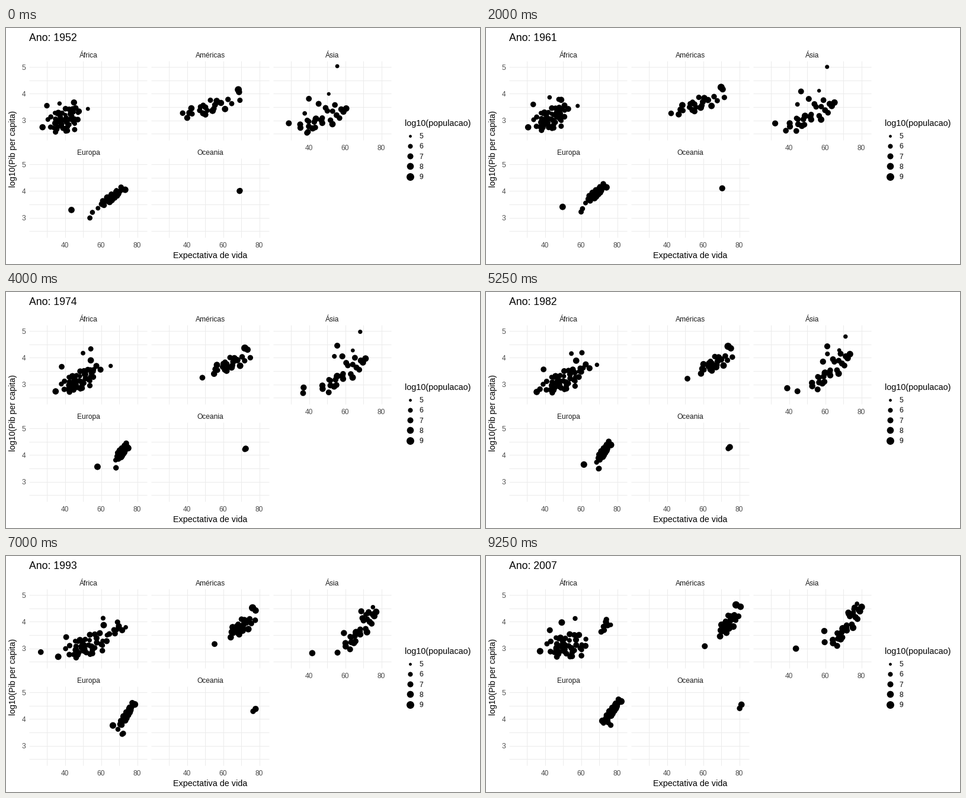
Write a matplotlib script that moves like this. It is 800 px wide and 400 px high and loops after 10 s.

```python
import numpy as np
import matplotlib.pyplot as plt
from matplotlib.animation import FuncAnimation

plt.rcParams["font.family"] = "Liberation Sans"
W, H, DPI = 800, 400, 100
PX = 72 / DPI
FRAMES, HOLD = 40, 2
YEARS = [1952, 1974, 1993, 2007]
RNG = np.random.default_rng(8)

# Panels: title, column, row
PANELS = [("África", 0, 0), ("Américas", 1, 0), ("Ásia", 2, 0),
          ("Europa", 0, 1), ("Oceania", 1, 1)]
AFRICA, AMERICAS, ASIA, EUROPE, OCEANIA = range(5)

# Clouds: panel, count, mean log population, then for each of YEARS
# mean life, life spread, mean gdp, gdp slope, gdp spread
CLOUDS = [
    (AFRICA, 40, 6.6, [(39, 4.5, 2.97, .06, .24), (47, 4.8, 3.1, .12, .19),
                       (52, 6.2, 3.08, .13, .21), (52, 5.8, 3.07, .04, .24)]),
    (AFRICA, 6, 6.7, [(44, 2, 3.27, .1, .1), (55, 2.5, 3.52, .08, .1),
                      (68, 2, 3.67, .07, .1), (72.8, 1, 3.8, .1, .1)]),
    (AMERICAS, 22, 6.8, [(52.5, 8, 3.48, .11, .14), (63.5, 5.5, 3.75, .1, .13),
                         (70, 3.7, 3.8, .1, .15), (73.7, 2.8, 3.9, .12, .17)]),
    (ASIA, 25, 7.1, [(47.5, 8, 3.05, .22, .18), (59, 7.5, 3.36, .35, .18),
                     (68.5, 5.3, 3.68, .4, .18), (72, 5, 3.83, .42, .18)]),
    (EUROPE, 27, 6.9, [(65.8, 3.7, 3.77, .17, .08), (71.5, 1.7, 4.12, .11, .1),
                       (74, 2.3, 4.15, .23, .08), (77.3, 2.4, 4.32, .2, .08)]),
]

# Landmarks: panel, log population, (life, log gdp) for each of YEARS
LANDMARKS = [
    (AFRICA, 5.9, [(37, 3.63), (50, 4.17), (61.2, 4.13), (56.7, 4.12)]),
    (AFRICA, 6.4, [(42.7, 3.38), (54.3, 4.33), (69.2, 3.98), (74, 4.08)]),
    (AFRICA, 7.4, [(45, 3.67), (54.3, 3.9), (61.5, 3.87), (49.3, 3.97)]),
    (AFRICA, 6.8, [(30, 3.55), (38.2, 3.66), (40.7, 3.42), (42.7, 3.68)]),
    (AFRICA, 5.7, [(52.7, 3.43), (65.3, 3.69), (73.7, 3.79), (76.4, 3.88)]),
    (AFRICA, 6.7, [(40, 2.69), (44.8, 2.79), (26.5, 2.86), (46.2, 2.94)]),
    (AMERICAS, 8.4, [(68.4, 4.15), (72, 4.36), (76.3, 4.52), (78.2, 4.63)]),
    (AMERICAS, 7.4, [(68.8, 4.06), (73.5, 4.3), (78, 4.42), (80.7, 4.56)]),
    (AMERICAS, 6.8, [(37.6, 3.27), (48.5, 3.25), (55.3, 3.16), (60.9, 3.08)]),
    (ASIA, 5.7, [(55.6, 5.03), (68.3, 4.97), (75.4, 4.54), (77.6, 4.67)]),
    (ASIA, 7.2, [(28.8, 2.89), (37, 2.88), (41.8, 2.82), (43.8, 2.99)]),
    (ASIA, 6.9, [(39.4, 2.57), (36.7, 2.67), (55.9, 2.84), (59.7, 3.23)]),
    (ASIA, 7.1, [(45.3, 3.62), (58.4, 4.05), (59.3, 3.57), (59.5, 3.65)]),
    (ASIA, 7, [(39.9, 3.81), (55.6, 4.45), (69, 4.39), (72.8, 4.34)]),
    (ASIA, 5.5, [(50.9, 3.99), (64.2, 4.27), (72.8, 4.29), (75.6, 4.47)]),
    (ASIA, 6, [(37.6, 3.26), (54, 4.05), (71.5, 4.27), (75.6, 4.35)]),
    (EUROPE, 7.6, [(43.6, 3.29), (58, 3.56), (66.6, 3.76), (71.8, 3.93)]),
    (EUROPE, 6.4, [(55.2, 3.2), (68.2, 3.52), (71.7, 3.43), (76.4, 3.77)]),
    (EUROPE, 6.5, [(53.8, 2.99), (68.3, 3.52), (72.3, 3.46), (74.9, 3.87)]),
    (OCEANIA, 7.2, [(69.1, 4), (72.5, 4.24), (78, 4.38), (81.2, 4.54)]),
    (OCEANIA, 6.5, [(69.4, 4.02), (72, 4.21), (76.6, 4.29), (80.2, 4.4)]),
]


def to_x(life, col):
    return 99.5 + 206 * col + 3.05 * (np.asarray(life) - 40)


def to_y(gdp, row):
    return 156.5 + 165 * row - 45.2 * (np.asarray(gdp) - 3)


def area(pop):
    """Marker area in square points for a log10 population."""
    size = 1 + 5 * np.sqrt(np.clip((np.asarray(pop) - 4.78) / 4.34, 0, 1))
    radius = .375 * (2.845 * size + .945) - .2
    return (2 * radius * PX) ** 2


def spread(n):
    """Even spiral of n points around zero, denser inside, with jitter."""
    i = np.arange(n)
    r = 2.1 * ((i + .5) / n) ** .65
    turn = i * np.pi * (3 - 5 ** .5)
    return r * np.array([np.cos(turn), np.sin(turn)]) + RNG.normal(0, .2, (2, n))


def build_paths():
    """Pixel x and y of every point at each of YEARS, and its population."""
    xs, ys, pops = [], [], []

    def add(panel, life, gdp, pop):
        _, col, row = PANELS[panel]
        xs.append(to_x(life, col))
        ys.append(to_y(gdp, row))
        pops.append(pop)

    for panel, n, pop, keys in CLOUDS:
        life, width, gdp, slope, noise = np.array(keys).T
        for a, b in spread(n).T:
            add(panel, life + width * a, gdp + slope * a + noise * b,
                pop + RNG.normal(0, .5))
    for panel, pop, keys in LANDMARKS:
        add(panel, *np.array(keys).T, pop)
    return np.array(xs), np.array(ys), np.array(pops)


fig = plt.figure(figsize=(W / DPI, H / DPI), dpi=DPI, facecolor="white")
ax = fig.add_axes([0, 0, 1, 1])
ax.set(xlim=(0, W), ylim=(H, 0))
ax.axis("off")


def label(x, y, text, px, color="black", ha="left", **kw):
    return ax.text(x, y, text, fontsize=px * PX, color=color, ha=ha, **kw)


GRID = dict(color="#EBEBEB", lw=PX, zorder=0)
for name, col, row in PANELS:
    left, top = 39 + 206 * col, 56 + 165 * row
    ax.vlines(to_x(np.arange(30, 81, 10), col), top, top + 134, **GRID)
    ax.hlines(to_y(np.arange(2.5, 5.1, .5), row), left, left + 199, **GRID)
    label(left + 100, top - 6, name, 12, "#1A1A1A", "center")
    if row == 1 or col == 2:
        for v in (40, 60, 80):
            label(to_x(v, col), top + 151, v, 12, "#4D4D4D", "center")
    if col == 0:
        for v in (3, 4, 5):
            label(33, to_y(v, row) + 4.5, v, 12, "#4D4D4D", "right")

label(344.5, 390, "Expectativa de vida", 14.4, ha="center")
label(19.5, 205, "log10(Pib per capita)", 14, ha="right", va="center",
      rotation=90, rotation_mode="default")
label(673, 166, "log10(populacao)", 14.4)

DOT = dict(c="black", lw=0)
for k, pop in enumerate(range(5, 10)):
    y = 182.5 + 17.28 * k
    ax.scatter(682, y, s=area(pop), **DOT)
    label(697, y + 4.5, pop, 12)

title = label(39, 22, "", 17.6)
xs, ys, pops = build_paths()
dots = ax.scatter(xs[:, 0], ys[:, 0], **DOT)


def update(i):
    progress = np.clip((i - HOLD) / 35, 0, 1)
    year = 1952 + 55 * progress
    at = [[np.interp(year, YEARS, p) for p in part] for part in (xs, ys)]
    dots.set_offsets(np.column_stack(at))
    dots.set_sizes(area(pops + .35 * (progress - .5)))
    title.set_text(f"Ano: {year:.0f}")
    return dots, title


anim = FuncAnimation(fig, update, frames=FRAMES, interval=250, repeat=True,
                     repeat_delay=0, init_func=lambda: update(0))
plt.show()
```
